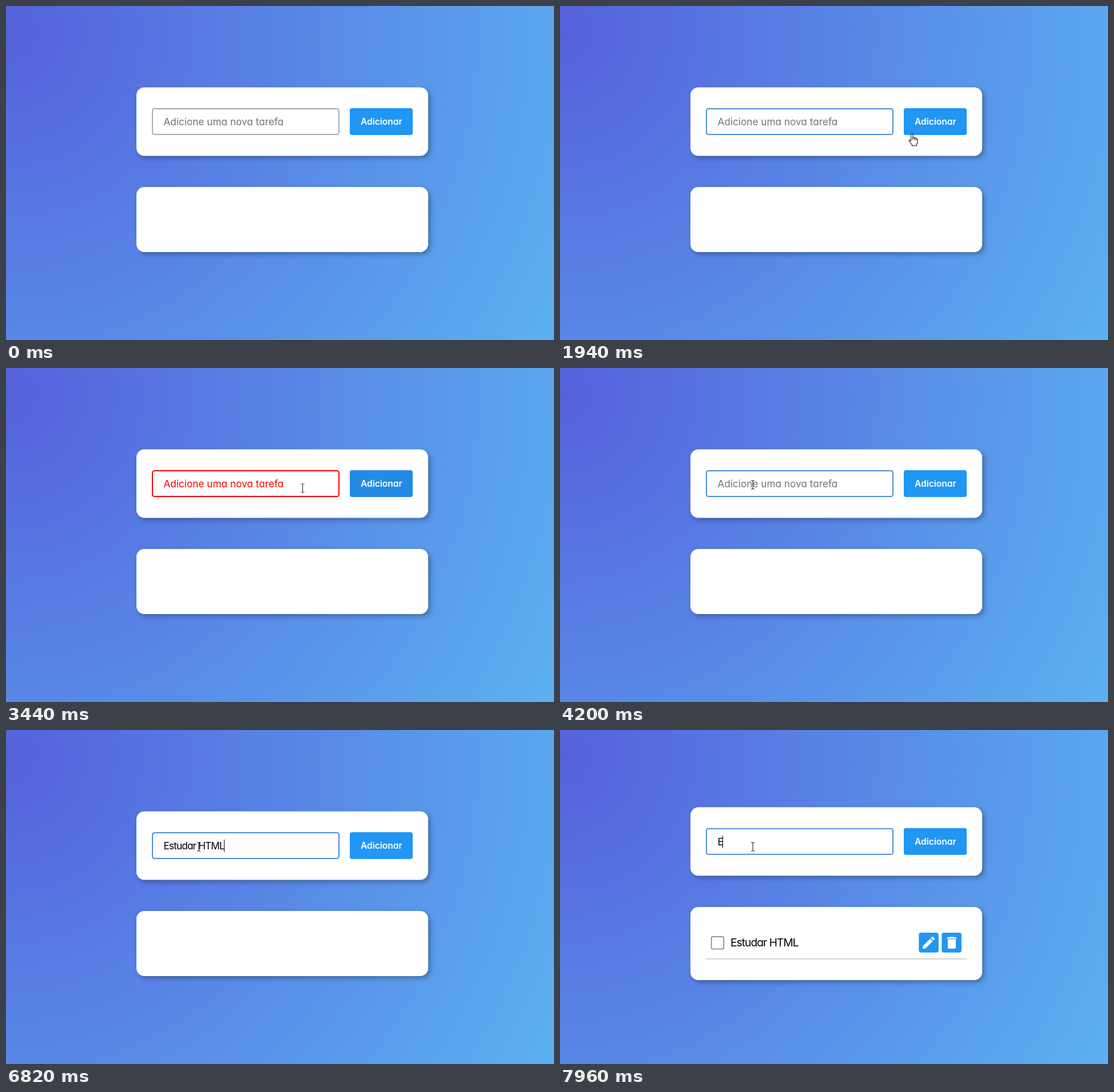
These frames come from a looping animation (958 by 585 pixels, 8000 ms). An HTML page:

```html
<!DOCTYPE html>
<html lang="pt">
<head>
<meta charset="utf-8">
<title>Lista de tarefas</title>
<style>
html, body { margin: 0; width: 100%; height: 100%; overflow: hidden; }
body { background: radial-gradient(circle at 0 8%, #5561dc, #5cb1f1); }
svg { display: block; width: 958px; height: 585px; }
text { font-family: Poppins, Inter, sans-serif; font-feature-settings: "cv11"; white-space: pre; }
.card { fill: #fff; filter: drop-shadow(4px 4px 4px rgba(0, 0, 0, .28)); }
.field { font-size: 17.2px; }
.typed { letter-spacing: -.05em; }
.cursor path { stroke: #111; stroke-linejoin: round; }
</style>
</head>
<body>
<svg viewBox="0 0 958 585">
  <g id="form">
    <rect class="card" x="228" y="142.5" width="510" height="120" rx="14"/>
    <rect id="input" x="256" y="180" width="326" height="45" rx="3.5" fill="#fff" stroke-width="2"/>
    <text id="hint" class="field" x="275.5" y="209">Adicione uma nova tarefa</text>
    <text id="typed" class="field typed" x="275.5" y="209"></text>
    <rect id="caret" y="192" width="1" height="22" shape-rendering="crispEdges"/>
    <rect id="button" x="601" y="179" width="110" height="47" rx="4"/>
    <text x="656.3" y="208.3" text-anchor="middle" font-size="15.5" font-weight="600" fill="#fff">Adicionar</text>
  </g>
  <rect id="list" class="card" x="228" width="510" rx="14"/>
  <g id="task">
    <rect x="264.7" y="362" width="21.6" height="21.6" rx="2.5" fill="#fff" stroke="#767676" stroke-width="1.4"/>
    <text class="typed" x="298" y="379.3" font-size="19.2">Estudar HTML</text>
    <rect x="255" y="400" width="456" height="1.8" fill="#d2d2d2"/>
    <g fill="#2196f3">
      <rect x="627.3" y="355" width="34.6" height="34.8" rx="4"/>
      <rect x="667.3" y="355" width="34.6" height="34.8" rx="4"/>
    </g>
    <g fill="#fff">
      <path transform="translate(630.6 358.4) scale(1.17)" d="M3 17.25V21h3.75L17.81 9.94l-3.75-3.75zM20.71 7.04a1 1 0 0 0 0-1.41l-2.34-2.34a1 1 0 0 0-1.41 0l-1.83 1.83 3.75 3.75z"/>
      <path transform="translate(670.9 358.4) scale(1.17)" d="M6 19a2 2 0 0 0 2 2h8a2 2 0 0 0 2-2V7H6zM19 4h-3.5l-1-1h-5l-1 1H5v2h14z"/>
    </g>
  </g>
  <g id="cursor" class="cursor">
    <circle id="glow" cx="-1" cy="-1" r="11" fill="#ff0" fill-opacity=".6"/>
    <path id="arrow" fill="#fff" d="M0 0V16.5L3.8 13 6.3 18.8 8.6 17.8 6.2 12.1H11.3Z"/>
    <path id="beam" fill="none" d="M-3-7.5h2l1 1 1-1h2M0-6.5v13M-3 7.5h2l1-1 1 1h2"/>
    <path id="hand" fill="#fff" stroke-width="1.1" d="M-2 1.3Q-2-.2-.4-.2T1.2 1.3V6.5Q3.5 5.5 4 7.2 6.2 6.4 6.8 8.2 9.3 7.7 9.3 10V14Q9.3 16.5 7.8 18.3V20.8H-.2V18.8L-5 13.4Q-6 11.8-4.8 11.1T-2 12.4ZM1.2 6.5V10.5M4 7.2V10.8M6.8 8.2V11.2"/>
  </g>
</svg>
<script>
const $ = id => document.getElementById(id);
const set = (id, attrs) => { for (const k in attrs) $(id).setAttribute(k, attrs[k]); };
const show = (id, on) => $(id).style.display = on ? '' : 'none';
const between = (t, a, b) => t >= a && t < b;

const GREY = [170, 170, 170], BLUE = [74, 141, 214], RED = [250, 0, 0];
const HINT = [108, 117, 125], HINT_LATE = [117, 117, 117];
const LIGHT = [33, 150, 243], DARK = [40, 114, 196];

// time, x, y of the pointer's hot spot
const PATH = [
  [200, 815, 553], [340, 690, 480], [560, 470, 345], [770, 363, 262], [980, 379, 209],
  [1050, 380, 206.5], [1300, 380, 206.5], [1500, 435, 210], [1800, 570, 220],
  [1940, 615.5, 224], [2330, 649, 201], [3160, 649, 201], [3300, 606, 210],
  [3600, 420, 211], [3860, 337, 204.5]
];
const CLICKS = [[1050, 1260], [2350, 2560], [4060, 4200]];
const TEXT = 'Estudar HTML';
const KEYS = [5100, 5430, 5630, 5830, 5920, 6010, 6100, 6190, 6280, 6490, 6560, 6820];
const ADDED = 7150, RETYPE = 7960;

// Colour fading through [start, duration, colour] steps
function fade(t, from, ...steps) {
  let c = from;
  for (const [start, duration, to] of steps) {
    const p = Math.min(1, Math.max(0, (t - start) / duration));
    c = c.map((v, i) => v + (to[i] - v) * p);
  }
  return `rgb(${c.map(Math.round)})`;
}

function pointAt(t) {
  const i = PATH.findIndex(k => k[0] > t);
  if (i < 0) return PATH[PATH.length - 1].slice(1);
  if (i === 0) return PATH[0].slice(1);
  const [t0, x0, y0] = PATH[i - 1], [t1, x1, y1] = PATH[i];
  const p = (t - t0) / (t1 - t0);
  return [x0 + (x1 - x0) * p, y0 + (y1 - y0) * p];
}

function drawCursor(t) {
  const [x, y] = pointAt(t);
  const row = between(y, 179, 226);
  const kind = row && between(x, 255, 583) ? 'beam' : row && between(x, 601, 711) ? 'hand' : 'arrow';
  for (const k of ['arrow', 'beam', 'hand']) show(k, k === kind);
  show('cursor', t >= 200);
  show('glow', CLICKS.some(([a, b]) => between(t, a, b)));
  set('cursor', { transform: `translate(${x} ${y})` });
}

function draw(t) {
  const added = t >= ADDED;
  const count = added ? +(t >= RETYPE) : KEYS.filter(k => t >= k).length;
  const typed = TEXT.slice(0, count);
  if ($('typed').textContent !== typed) $('typed').textContent = typed;

  set('form', { transform: `translate(0 ${added ? -7.2 : 0})` });
  set('list', added ? { y: 310, height: 128 } : { y: 317, height: 114 });
  show('task', added);

  show('hint', !count);
  set('hint', { fill: fade(t, HINT, [2430, 200, RED], [4060, 140, HINT_LATE]) });
  set('input', { stroke: fade(t, GREY, [1120, 200, BLUE], [2430, 200, RED], [4060, 140, BLUE]) });
  set('button', { fill: fade(t, LIGHT, [1940, 200, DARK], [3300, 200, LIGHT]) });

  const width = count ? $('typed').getComputedTextLength() : 0;
  set('caret', { x: Math.round(275 + width) });
  show('caret', count || between(t, ADDED, 7370) || t >= 7900);
  drawCursor(t);
}

const begin = performance.now();
function tick() {
  draw((performance.now() - begin) % 8000);
  requestAnimationFrame(tick);
}
tick();
</script>
</body>
</html>
```
